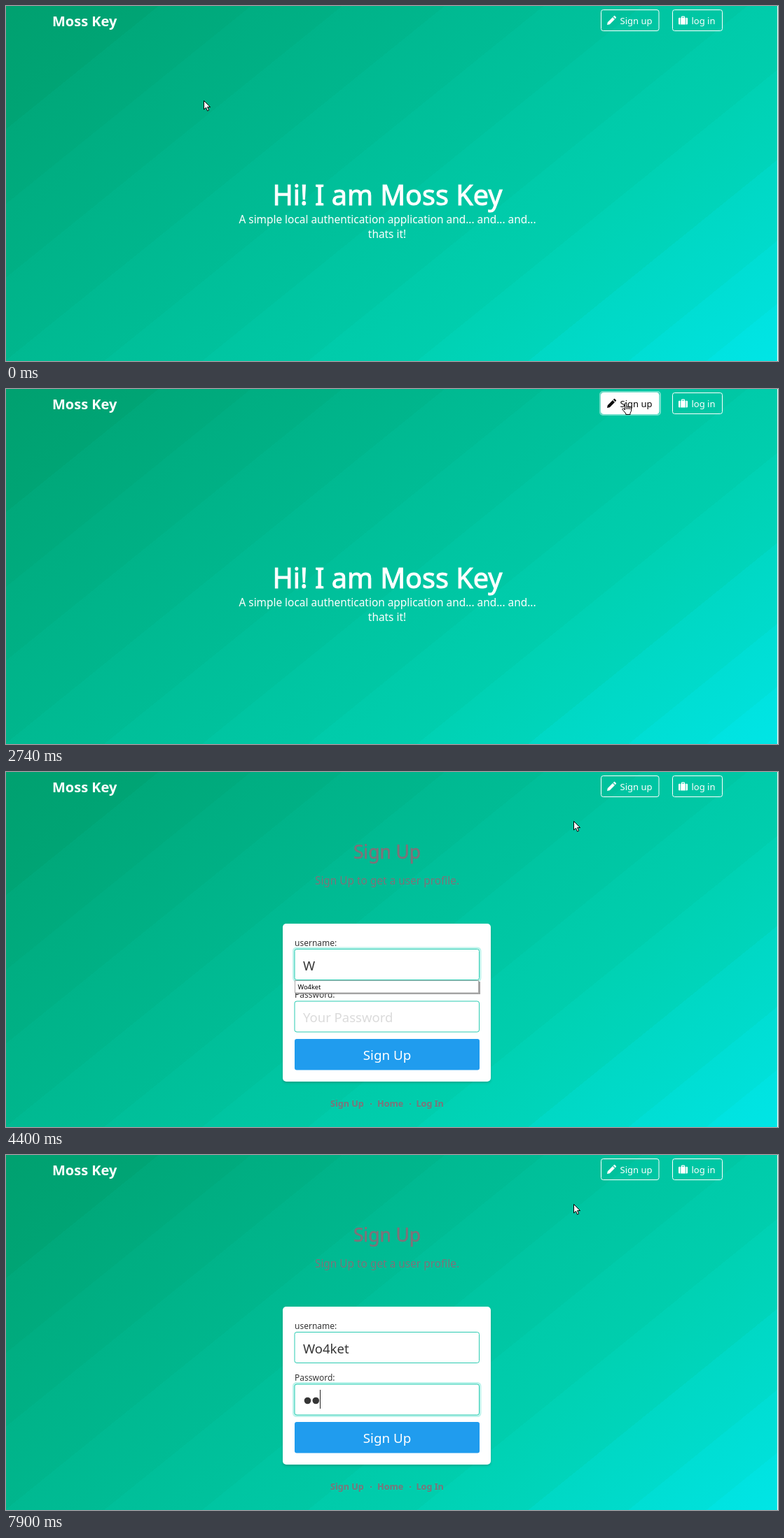
These frames come from a looping animation (1102 by 508 pixels, 8 s). An HTML page:

```html
<!DOCTYPE html>
<html lang="en">
<head>
<meta charset="utf-8">
<title>Sign up demo</title>
<style>
  html, body { margin: 0; width: 100%; height: 100%; overflow: hidden; background: #fff; }
  #hero { position: absolute; left: 0; top: 0; width: 1101px; height: 508px; background: #00c19f; }
  svg { position: absolute; left: 0; top: 0; }
  text { font-family: "Noto Sans", "Open Sans", sans-serif; fill: #fff; white-space: pre; }
  .mid { text-anchor: middle; }
  .logo { font-size: 20px; font-weight: 700; }
  .h1 { font-size: 39.6px; stroke: #fff; stroke-width: 1; }
  .h3 { font-size: 26.4px; stroke: #7f7279; stroke-width: .6; }
  .sub { font-size: 15.4px; }
  .muted text { fill: #7f7279; }
  .links text { font-size: 12.6px; font-weight: 700; }
  .btn { color: #fff; }
  .btn rect { fill: none; stroke: #fff; }
  .btn text { font-size: 13px; fill: currentColor; }
  .btn path { fill: currentColor; }
  .btn.hover { color: #0a0a0a; }
  .btn.hover rect { fill: #fff; }
  .card { fill: #fff; filter: drop-shadow(0 2px 1.5px rgba(10, 10, 10, .18)); }
  .label { font-size: 12px; fill: #363636; }
  .field { fill: #fff; stroke: #2bcbb1; }
  .ring { fill: none; stroke: #00d1b2; stroke-opacity: .25; stroke-width: 3; }
  .big { font-size: 18.5px; fill: #363636; }
  .hint { fill: #dbdbdb; }
  .submit { font-size: 18.8px; }
  .tip { font-size: 9.3px; fill: #000; }
  .pointer path { fill: #fff; stroke: #000; stroke-linejoin: round; }
</style>
</head>
<body>
<div id="hero"></div>
<svg width="1102" height="508" viewBox="0 0 1102 508">
  <text class="logo" x="66" y="29">Moss Key</text>

  <rect data-on="2740-2860" x="848" y="4" width="86" height="33" rx="4"
        fill="none" stroke="#fff" stroke-opacity=".45" stroke-width="2"/>
  <g class="btn" id="signup">
    <rect x="849.5" y="5.5" width="82.5" height="30" rx="3"/>
    <path transform="translate(858 14)" d="M0 13l.8-3.8L8 2l3 3-7.2 7.2zM8.8 1.2l.9-.9a1 1 0 0 1 1.5 0l1.5 1.5a1 1 0 0 1 0 1.5l-.9.9z"/>
    <text x="876.5" y="26">Sign up</text>
  </g>
  <g class="btn">
    <rect x="951.5" y="5.5" width="71" height="30" rx="3"/>
    <path transform="translate(960 14)" d="M1.3 2.8H2.4V12.5H1.3A1.3 1.3 0 0 1 0 11.2V4.1A1.3 1.3 0 0 1 1.3 2.8zM10.6 2.8H11.7A1.3 1.3 0 0 1 13 4.1V11.2A1.3 1.3 0 0 1 11.7 12.5H10.6zM3.2 12.5V2.8H4V1.5A1 1 0 0 1 5 .5H8A1 1 0 0 1 9 1.5V2.8H9.8V12.5zM5.2 2.8H7.8V1.7H5.2z"/>
    <text x="978.5" y="26">log in</text>
  </g>

  <g class="mid" data-on="0-2860">
    <text class="h1" x="544.5" y="285">Hi! I am Moss Key</text>
    <text class="sub" x="544.5" y="311">A simple local authentication application and... and... and...</text>
    <text class="sub" x="544" y="332">thats it!</text>
  </g>

  <g data-on="2860-8000">
    <g class="muted mid">
      <text class="h3" x="544" y="124">Sign Up</text>
      <text class="sub" x="544" y="161">Sign Up to get a user profile.</text>
    </g>
    <rect class="card" x="395" y="217" width="297" height="226" rx="5"/>
    <text class="label" x="412" y="249">username:</text>
    <text class="label" x="412" y="323">Password:</text>

    <rect class="ring" data-on="2860-7190" x="410.5" y="252" width="266.5" height="47" rx="4"/>
    <rect class="ring" data-on="7190-8000" x="410.5" y="326.5" width="266.5" height="47" rx="4"/>
    <rect class="field" x="412" y="253.5" width="263.5" height="44" rx="3"/>
    <rect class="field" x="412" y="328" width="263.5" height="44" rx="3"/>

    <text class="big hint" data-on="2860-4400" x="424" y="284">Your Name</text>
    <text class="big hint" data-on="2860-7750" x="424" y="358">Your Password</text>
    <text class="big" id="name" x="424" y="284"></text>
    <g fill="#363636">
      <circle data-on="7750-8000" cx="430.5" cy="351.5" r="4.8"/>
      <circle data-on="7900-8000" cx="442.3" cy="351.5" r="4.8"/>
    </g>
    <rect id="caret" width="1" height="27" fill="#222"/>

    <g data-on="4400-7190">
      <rect x="414" y="300" width="263" height="18" fill="#8b8b8b" opacity=".8"/>
      <rect x="412.5" y="298.5" width="262" height="17.5" fill="#fff" stroke="#a8a8a8"/>
      <text class="tip" x="416.5" y="311">Wo4ket</text>
    </g>

    <rect x="412" y="382" width="264" height="44.5" rx="3" fill="#209cee"/>
    <text class="submit mid" x="544" y="412">Sign Up</text>
    <g class="muted links">
      <text x="463" y="479">Sign Up</text>
      <text class="mid" x="521" y="479">·</text>
      <text x="530" y="479">Home</text>
      <text class="mid" x="577" y="479">·</text>
      <text x="585.5" y="479">Log In</text>
    </g>
  </g>

  <g class="pointer" id="pointer">
    <path id="arrow" d="M.5 .5V13l3-2.7 2 4.8 2.1-.9-2-4.6h4z"/>
    <g id="hand">
      <path d="M4.5 11V2a1.2 1.2 0 0 1 2.4 0V6.5a1.2 1.2 0 0 1 2.2.4a1.2 1.2 0 0 1 2.2.6a1.1 1.1 0 0 1 2.2.7V12.5L12 15.5V17.5H5.8V16L1 10.4a1.2 1.2 0 0 1 1.8-1.4z"/>
      <path d="M6.9 6.5V10M9.1 7V10M11.3 7.8V10.2"/>
    </g>
  </g>
</svg>
<script>
  const LOOP = 8000, USER = "Wo4ket";
  const $ = id => document.getElementById(id);

  // Diagonal gradient split into bands, each flatter than the overall slope.
  const DARK = [0, 158, 108], MAIN = [0, 209, 178], LIGHT = [0, 231, 235];
  const edges = [0, 137, 220, 302, 394, 483, 571, 666, 764, 864, 954, 1024, 1100];
  const mix = (a, b, k) => `rgb(${a.map((v, i) => v + (b[i] - v) * k)})`;
  const shade = d => d < 785 ? mix(DARK, MAIN, d / 785) : mix(MAIN, LIGHT, (d - 785) / 320);
  const stops = edges.slice(1).flatMap((end, i) => {
    const from = edges[i], inset = (end - from) * .3;
    return [`${shade(from + inset)} ${from}px`, `${shade(end - inset)} ${end}px`];
  });
  $("hero").style.backgroundImage = `linear-gradient(141deg, ${stops})`;

  // time, x, y
  const moves = [
    [0, 282, 135], [460, 284, 135], [600, 376, 131], [730, 475, 125], [880, 576, 119],
    [1030, 640, 108], [1160, 700, 96], [1280, 748, 85], [1400, 790, 74],
    [1550, 830, 54], [1680, 860, 36], [1830, 873, 22], [1970, 879, 19],
    [3110, 848, 42], [3230, 823, 62], [3390, 810, 70]
  ];
  const keys = [4400, 4680, 5820, 6130, 6270, 6390];
  const dots = [7750, 7900];
  const blinks = [[2860, 3390], [3850, 4400], [4680, 4950], [5380, 5970],
                  [6130, 6510], [6910, 7620], [7750, LOOP]];

  const within = (t, [a, b]) => t >= a && t < b;
  const count = (times, t) => times.filter(k => k <= t).length;
  const show = (el, on) => el.setAttribute("visibility", on ? "inherit" : "hidden");
  const timed = [...document.querySelectorAll("[data-on]")]
    .map(el => [el, el.dataset.on.split("-").map(Number)]);

  function draw(t) {
    for (const [el, span] of timed) show(el, within(t, span));

    const [, x, y] = moves.filter(m => m[0] <= t).pop();
    const hover = within(t, [1830, 3110]);
    $("pointer").setAttribute("transform", `translate(${x} ${y})`);
    show($("arrow"), !hover);
    show($("hand"), hover);
    $("signup").classList.toggle("hover", hover);

    const name = $("name"), caret = $("caret"), inPass = t >= 7190;
    name.textContent = USER.slice(0, count(keys, t));
    const width = inPass ? count(dots, t) * 12 : name.getComputedTextLength();
    caret.setAttribute("x", 424 + Math.round(width));
    caret.setAttribute("y", inPass ? 336 : 262);
    show(caret, blinks.some(b => within(t, b)));
  }

  const start = performance.now();
  function tick() {
    draw((performance.now() - start) % LOOP);
    requestAnimationFrame(tick);
  }
  tick();
</script>
</body>
</html>
```
